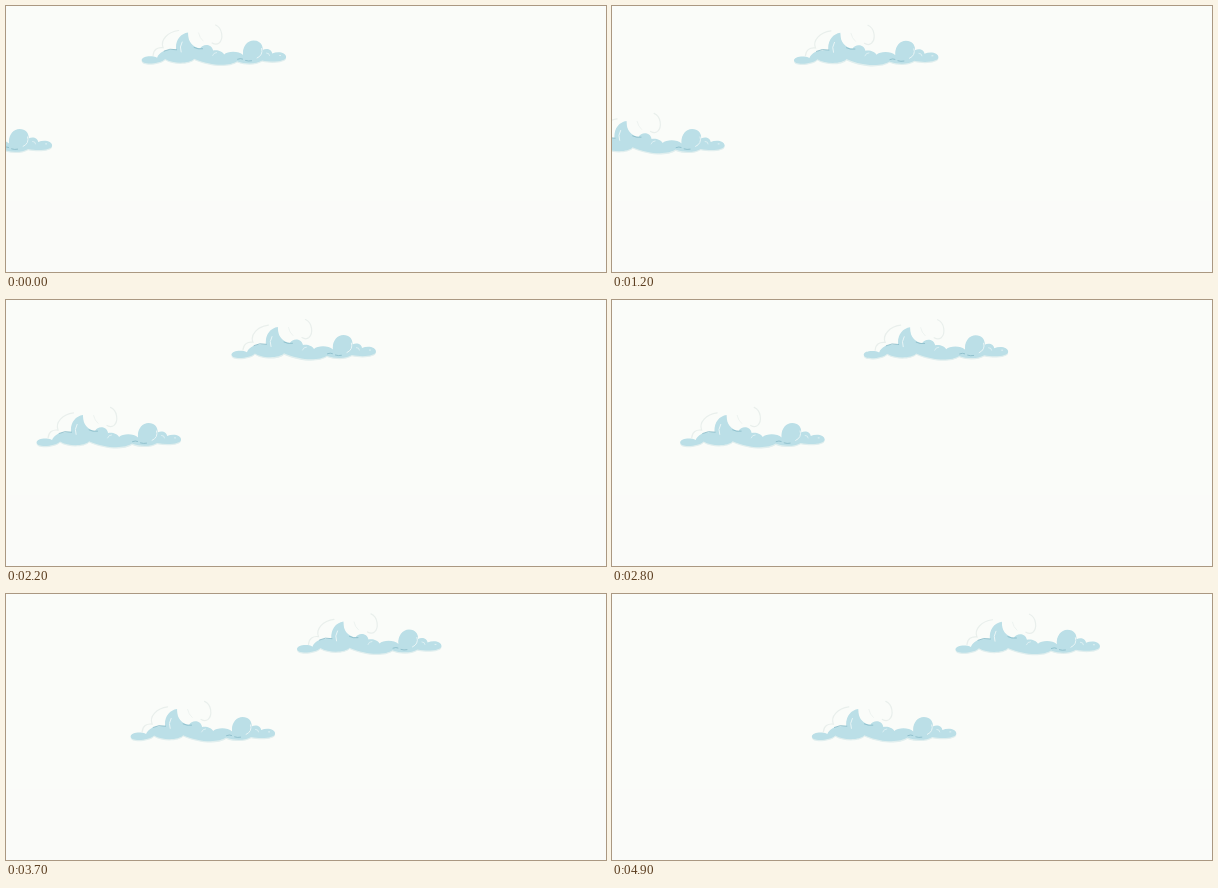
Write an HTML page that moves like this. It is 600 px wide and 266 px high and loops after 5000 ms.

```html
<!DOCTYPE html>
<html lang="en">
<head>
<meta charset="utf-8">
<title>Drifting clouds</title>
<style>
  html, body { margin: 0; width: 100%; height: 100%; overflow: hidden; background: #fafcf9; }
  svg { display: block; width: 600px; height: 266px; }
  .line { fill: none; stroke-linecap: round; }
</style>
</head>
<body>
<svg viewBox="0 0 600 266">
  <defs>
    <path id="body" d="M0 54 C.5 50 10.500 49 15.500 51.700 C17.500 46 25 43 34.500 43.700
      C33.500 35 38.500 27.500 46.500 26.500 C46 35 50.500 41 58.500 42.500
      C61 37.500 70 37.500 71.500 44.500 C76 43.500 81 45.500 82.500 48.500
      C86 45 97 44.500 101.500 49 C100.500 41 105.500 34.500 112 34.500 C118.500 34.500 121.500 39 121 44
      C125.500 41.500 130.500 44 130.500 47.500 C136.500 45 144.500 46.500 144.500 51
      C144.500 55 132.500 57 120.500 54.500 C114.500 58 104.500 58.500 95.500 55.200
      C88.500 59.800 71.500 61 52.500 52.800 C48.500 57.500 32.500 58.500 23.500 53 C18.500 58 .5 59.500 0 54Z"/>
    <g id="cloud">
      <use href="#body" y="1.300" fill="#e0eeee"/>
      <use href="#body" fill="#bbdfe7"/>
      <g class="line" stroke="#e9efec" stroke-width="1.200">
        <path d="M11.500 49.500 C12 43.500 16 41 21.500 41.700 C18.500 34 26 26 37 24.500"/>
        <path d="M74 19 C81 22 82 33 77.500 37 C75.500 38.700 73 38.500 70.500 37"/>
        <path d="M57 27 Q58 32 61.500 35" stroke-width=".7"/>
      </g>
      <g class="line" stroke="#86b9c7" stroke-width=".8">
        <path d="M22.500 45 Q28 42 35 43.700"/>
        <path d="M52.500 41.500 Q56 43.500 61 42.800"/>
        <path d="M96 53.200 Q99 52 101 53 M104 54.500 Q107 55.500 110 54.800"/>
      </g>
      <g class="line" stroke="#e9f5f6" stroke-width="1">
        <path d="M40.500 36 Q37.500 41 39.500 46"/>
        <path d="M120 42.500 Q122 49 115.500 52"/>
        <path d="M71 49.500 Q72 46.500 75 46.500" stroke-width=".7"/>
        <path d="M125 47 Q128 47 128 49.500" stroke-width=".7"/>
        <path d="M138 49.500 H139" stroke-width=".8"/>
      </g>
    </g>
  </defs>
  <path d="M0 195H600V266H0Z" fill="#fafbf9"/>
  <use id="upper" href="#cloud"/>
  <use id="lower" href="#cloud"/>
</svg>
<script>
  const LOOP = 5000, STEP = 100;
  const upper = document.getElementById('upper');
  const lower = document.getElementById('lower');

  // Steady drift that picks up speed over the first 1.45 s.
  const drift = (t, start, speed, lag) =>
    start + speed * t + lag * Math.max(0, 1 - t / 1.45) ** 2;

  const place = (el, x, y) => el.setAttribute('transform', `translate(${x} ${y})`);

  function draw(now) {
    const t = Math.floor(now % LOOP / STEP) * STEP / 1000;
    place(upper, drift(t, 129.3, 43.7, 6.3), 0.25 * t);
    place(lower, drift(t, -107.4, 62.7, 9), 88.4);
  }

  const begin = performance.now();
  function tick() {
    draw(performance.now() - begin);
    requestAnimationFrame(tick);
  }
  tick();
</script>
</body>
</html>
```
